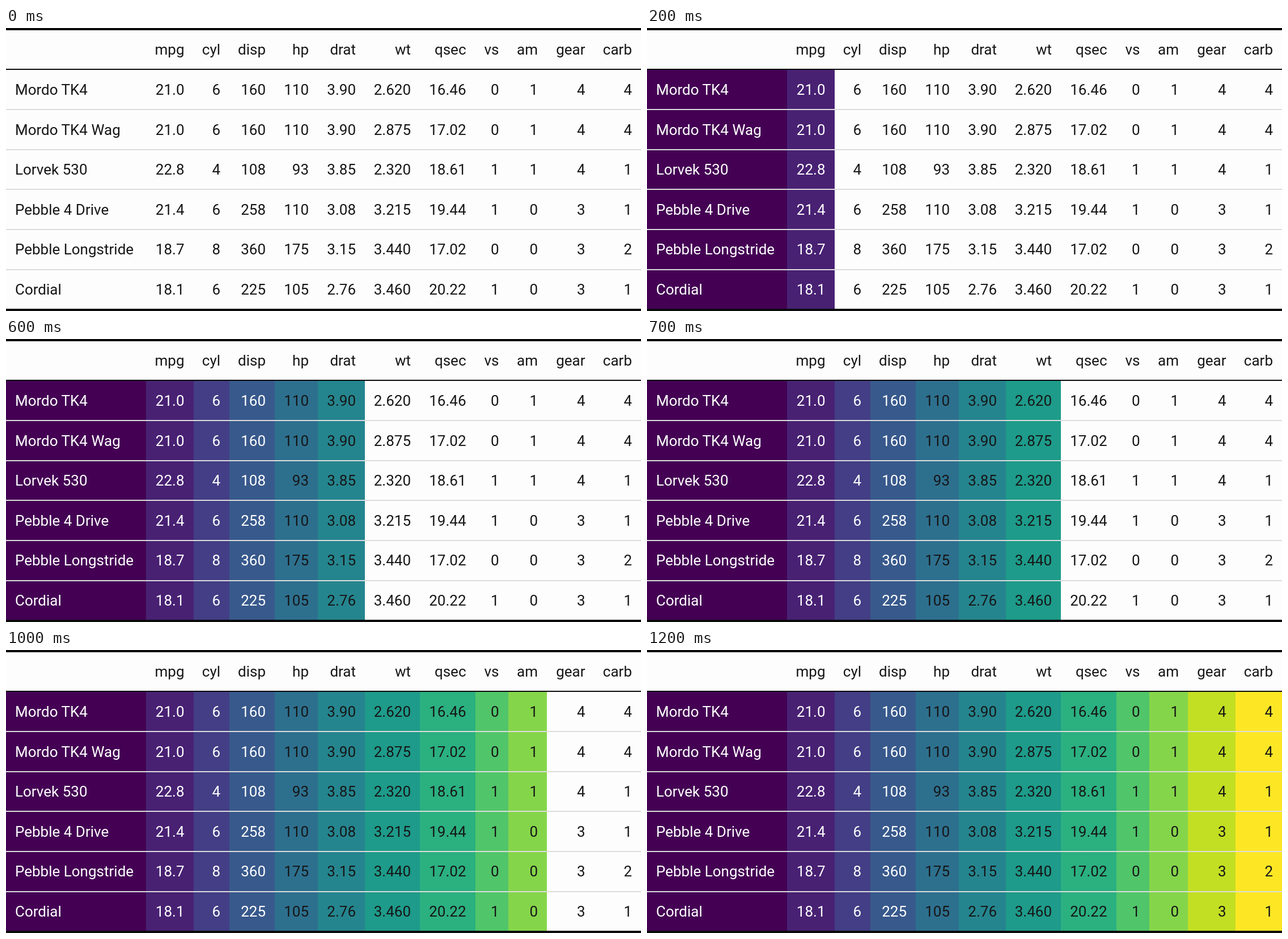
Write an HTML page that moves like this. It is 1120 px wide and 500 px high and loops after 1300 ms.

```html
<!DOCTYPE html>
<html lang="en">
<head>
<meta charset="utf-8">
<title>Table columns filling with colour</title>
<style>
  html, body { margin: 0; width: 100%; height: 100%; overflow: hidden; background: #fdfdfd; }
  svg { display: block; width: 1120px; height: 500px; }
  text { font: 26px Roboto, sans-serif; white-space: pre; }
</style>
</head>
<body>
<svg id="stage" viewBox="0 0 1120 500"></svg>
<script>
const INK = '#161617';
const STEP = 100, ROW = 70.6, HEAD = 73.5, PAD = 16;
const edges = [0, 246.5, 330.5, 394, 474, 550, 633, 730, 827.5, 885.5, 954, 1037.5, 1120];
const colors = ['#440154', '#482173', '#433e85', '#38598c', '#2d708e', '#25858e',
  '#1e9b8a', '#2bb07f', '#51c56a', '#85d54a', '#c2df23', '#fde725'];
const table = `
|mpg|cyl|disp|hp|drat|wt|qsec|vs|am|gear|carb
Mordo TK4|21.0|6|160|110|3.90|2.620|16.46|0|1|4|4
Mordo TK4 Wag|21.0|6|160|110|3.90|2.875|17.02|0|1|4|4
Lorvek 530|22.8|4|108|93|3.85|2.320|18.61|1|1|4|1
Pebble 4 Drive|21.4|6|258|110|3.08|3.215|19.44|1|0|3|1
Pebble Longstride|18.7|8|360|175|3.15|3.440|17.02|0|0|3|2
Cordial|18.1|6|225|105|2.76|3.460|20.22|1|0|3|1`.trim().split('\n').map(r => r.split('|'));

const stage = document.getElementById('stage');

function add(tag, attrs, parent = stage) {
  const el = document.createElementNS('http://www.w3.org/2000/svg', tag);
  for (const k in attrs) el.setAttribute(k, attrs[k]);
  return parent.appendChild(el);
}

function bar(x, y, width, height, fill) {
  return add('rect', { x, y, width, height, fill });
}

function label(str, col, y, parent) {
  const x = col ? edges[col + 1] - PAD : PAD;
  add('text', { x, y, 'text-anchor': col ? 'end' : 'start' }, parent).textContent = str;
}

const fills = colors.map((c, i) => {
  const x = Math.round(edges[i]);
  return bar(x, 74, Math.round(edges[i + 1]) - x, 422, c);
});

for (let r = 1; r < 6; r++) bar(0, Math.round(HEAD + r * ROW) - 1, 1120, 2, '#dcdcdc');
bar(0, 72, 1120, 2, '#0b0b0d');
bar(0, 0, 1120, 4, '#0b0b0d');
bar(0, 496, 1120, 4, '#0b0b0d');

const columns = colors.map((_, col) => {
  label(table[0][col], col, 47, add('g', { fill: INK }));
  const body = add('g', { fill: INK });
  for (let r = 1; r < table.length; r++) label(table[r][col], col, Math.round(118 + (r - 1) * ROW), body);
  return body;
});

// One more column is coloured at each step; the darkest four take white text.
function draw(now) {
  const count = Math.floor(now / STEP) % 13;
  fills.forEach((f, i) => {
    const on = i < count;
    f.setAttribute('visibility', on ? 'visible' : 'hidden');
    columns[i].setAttribute('fill', on && i < 4 ? '#fff' : INK);
  });
}

let start;
function tick(now) {
  start ??= now;
  draw(now - start);
  requestAnimationFrame(tick);
}
draw(0);
requestAnimationFrame(tick);
</script>
</body>
</html>
```
